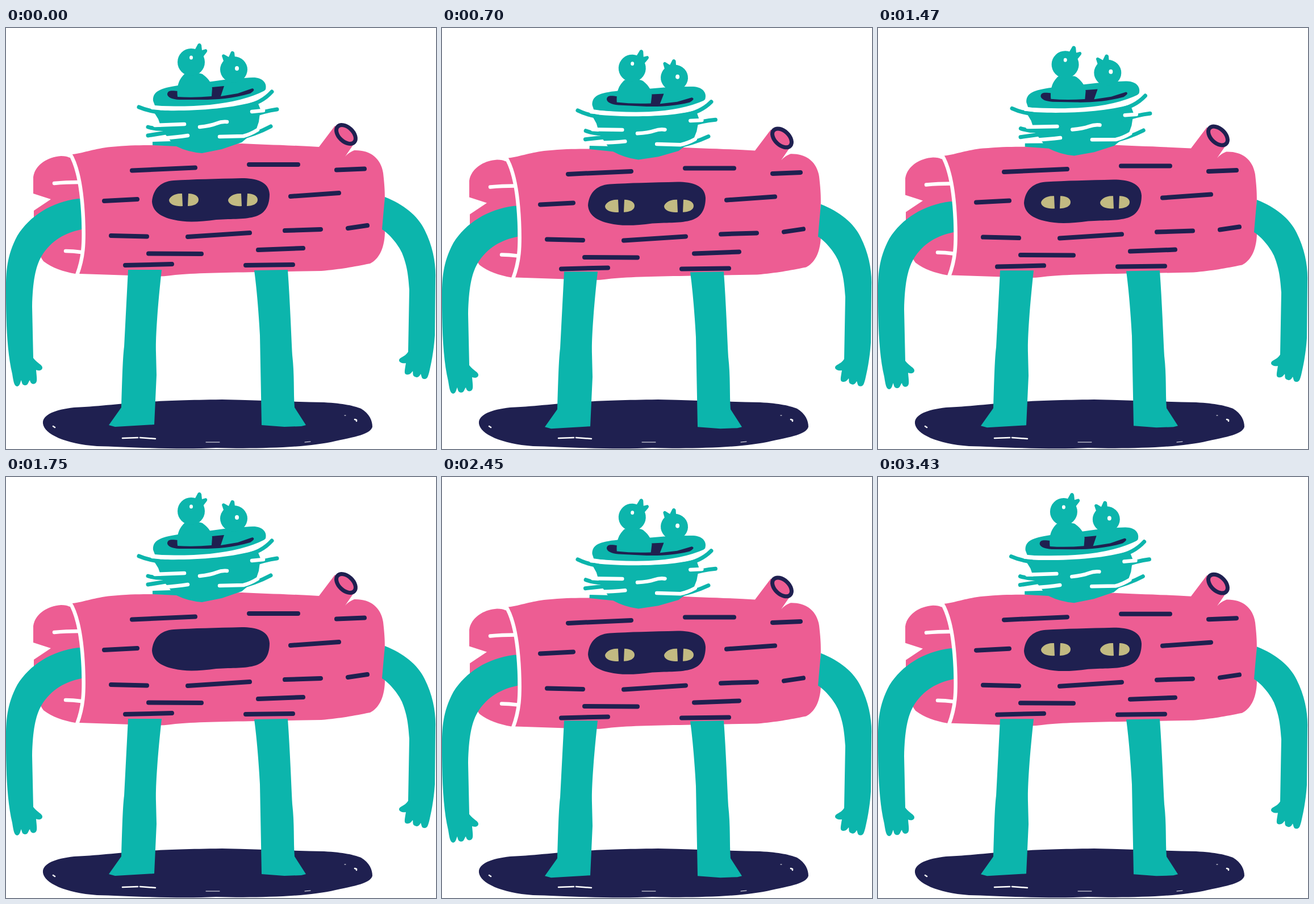
These frames come from a looping animation (757x740 px, 3.5 s). An HTML page:

```html
<!DOCTYPE html>
<html lang="en">
<head>
<meta charset="utf-8">
<title>Log creature</title>
<style>
  html, body { margin: 0; width: 100%; height: 100%; overflow: hidden; background: #fff; }
  svg { display: block; width: 757px; height: 740px; }
  path, ellipse { stroke-linecap: round; stroke-linejoin: round; }
  .teal { fill: #0cb5ac; }
  .pink { fill: #ed5d93; }
  .navy { fill: #1f2050; }
  .white { fill: #fff; }
  .line { fill: none; stroke-width: 8; }
  .line.teal { stroke: #0cb5ac; stroke-width: 7; }
  .line.navy { stroke: #1f2050; }
  .line.white { stroke: #fff; stroke-width: 6.5; }
  .ring { fill: #ed5d93; stroke: #1f2050; stroke-width: 7; }
</style>
</head>
<body>
<svg viewBox="0 0 757 740">
  <g id="ground">
    <path class="navy" d="M65 695C64 680 85 671 120 667C200 663 215 655 380 653C440 654 500 657 560 658C595 660 612 664 625 669C640 678 645 690 645 701C642 712 625 717 580 726C530 738 440 740 370 738C300 742 210 736 160 735C105 731 67 714 65 695Z"/>
    <path class="line white" style="stroke-width:2.5" d="M205 721L232 720M236 720L263 722M83 700L86 702M614 688L617 689V691"/>
    <path class="line white" style="stroke-width:1" d="M352 728H376M526 728L536 727M596 681H598"/>
  </g>

  <g id="body">
    <path class="pink" d="M48 291V262C50 245 68 227 97 225Q107 225 112 228L117 222C140 219 155 212 185 209C230 205 260 206 300 207L415 203C450 205 500 206 551 209L579 172L617 197L597 226Q603 219 613 215C640 214 660 228 664 255C668 290 667 300 666 330L667 360C666 390 655 407 641 414C610 420 590 424 555 427L440 429C380 430 330 431 298 434C270 438 250 437 220 435L130 432H122C100 428 82 422 66 410C55 395 50 370 49 340V321L79 301Z"/>
    <ellipse class="ring" cx="598.5" cy="187" rx="20" ry="12.500" transform="rotate(43 598.5 187)"/>
    <path class="navy" d="M257 305C259 285 270 270 295 268C330 266 370 265 415 264C440 264 463 270 464 292C464 310 458 325 440 331C420 337 400 335 370 337C340 341 315 342 295 337C272 332 258 322 257 305Z"/>
    <path class="line navy" d="M222 250.500L333 245.500M428 240H514M582 249.500L631 247.500M173 304L231 301M501 296L586 290M185 365L248 366.500M320 367L429 360M491 356L554 354M602 352L636 347M251 396.500L344 397M444 390L523 387M210 417L292 415M422 417L505 416"/>
    <path class="line white" d="M85 273Q105 271 128 271M105 392Q118 392 132 394"/>
  </g>

  <g id="legs" class="teal">
    <path d="M215 425L274 425C268 480 263 540 264 570L265 610L261 697L192 701L181 698L203 667C205 600 206 575 208 560Z"/>
    <path d="M437 426L496 425C500 480 502 540 504 575C508 610 506 640 508 667L528 698L520 700L490 701L450 698L447 540Q443 470 437 426Z"/>
  </g>

  <g id="arms" class="teal">
    <path d="M127 300C80 306 42 330 20 365C1 400 0 430 0 460C0 520 2 570 11 608C13 620 14 630 20 630C25 629 25 622 27 619C28 626 30 628 34 628C39 628 39 622 42 619C43 624 46 627 51 625C56 622 54 615 53 601C58 603 64 602 64 597C64 592 56 590 48 580L46 490C47 445 52 420 62 402C80 372 105 360 133 354V300Z"/>
    <path d="M667 297C700 310 725 330 737 355C752 385 757 415 756 440L755 540C753 570 748 592 745 605C743 612 742 617 737 617C731 617 732 612 730 608C727 614 724 615 720 613C715 611 717 607 716 603C713 607 710 610 705 609C700 608 702 602 704 589C698 590 692 588 692 584C693 578 702 579 708 569L710 460C708 430 705 415 697 395C690 380 675 362 662 354Q664 330 667 297Z"/>
  </g>

  <path id="bark" class="line white" style="stroke-linecap:butt" d="M112 220C128 245 134 290 136 335C138 380 136 405 125 434"/>

  <g id="eyes">
    <path id="eye" fill="#c2ba82" d="M310 291C296 290 287 298 287 303C288 311 300 314 311 313ZM321 291C333 291 339 296 339 302C339 309 330 313 320 313Z"/>
    <use href="#eye" x="104"/>
  </g>

  <g id="nest">
    <path class="teal" d="M258 144C300 147 390 145 442 128L448 143L445 165L440 180L415 201L380 213L345 220Q320 218 300 208L258 206V200L290 199L275 180L268 160Z"/>
    <path class="line teal" d="M234 139Q250 146 270 148M468 112Q450 132 420 138M477 143Q455 146 430 155M466 173Q440 187 405 195M250 174Q270 180 290 176M250 189L300 181"/>
    <path class="teal" d="M259 128C258 112 270 106 303 101L355 95L384 91C400 92 415 87 435 87C452 87 460 97 457 108C445 122 420 131 400 134C360 139 300 140 262 136Z"/>
    <path class="navy" d="M284 117C284 109 292 110 303 111L363 104L384 102V113L433 106Q441 108 430 115C400 124 370 126 345 126H305Q286 125 284 117Z"/>
    <path class="teal" d="M302 121C300 98 306 90 313 82C316 79 344 78 347 82C358 90 362 98 363 106L362 120Q330 123 302 121ZM386 90L384 102L378 120L408 115L434 106L422 88Z"/>
    <g class="teal">
      <ellipse cx="326" cy="60" rx="24" ry="24"/>
      <ellipse cx="401" cy="73" rx="24" ry="23"/>
      <path d="M332 39L338 28Q342 25 344 30L345 39L352 37Q356 39 353 43L346 52ZM379 67L383 58L380 49Q381 45 385 47L392 51L396 42Q399 39 402 43L403 52Z"/>
    </g>
    <g class="white">
      <ellipse cx="326" cy="52" rx="3" ry="3.5"/>
      <ellipse cx="406.500" cy="71" rx="3.500" ry="4"/>
    </g>
    <path class="line white" d="M258 140C320 142 400 142 457 113M433 147L453 145M341 174Q360 172 370 168T389 165M262 171L314 169M272 194Q300 192 320 189M376 191L418 190Q430 187 443 179"/>
  </g>
</svg>
<script>
  const LOOP = 3500, STEP = 70, BOB = 1750;
  const part = id => document.getElementById(id);
  const drops = { body: 8, bark: 8, legs: 4, arms: 16, eyes: 13.5 };

  function draw(now) {
    const t = Math.floor(now % LOOP / STEP) * STEP;
    // Linear sink and rise, 0 to 1 and back
    const sink = 1 - Math.abs(t % BOB / BOB * 2 - 1);
    for (const id in drops)
      part(id).setAttribute("transform", `translate(0 ${drops[id] * sink})`);
    part("nest").setAttribute("transform", `rotate(${3.6 * sink} 118 240)`);
    const blink = t >= 1680 && t < 1890;
    part("eyes").setAttribute("visibility", blink ? "hidden" : "visible");
  }

  const start = performance.now();
  function tick() {
    draw(performance.now() - start);
    requestAnimationFrame(tick);
  }
  tick();
</script>
</body>
</html>
```
